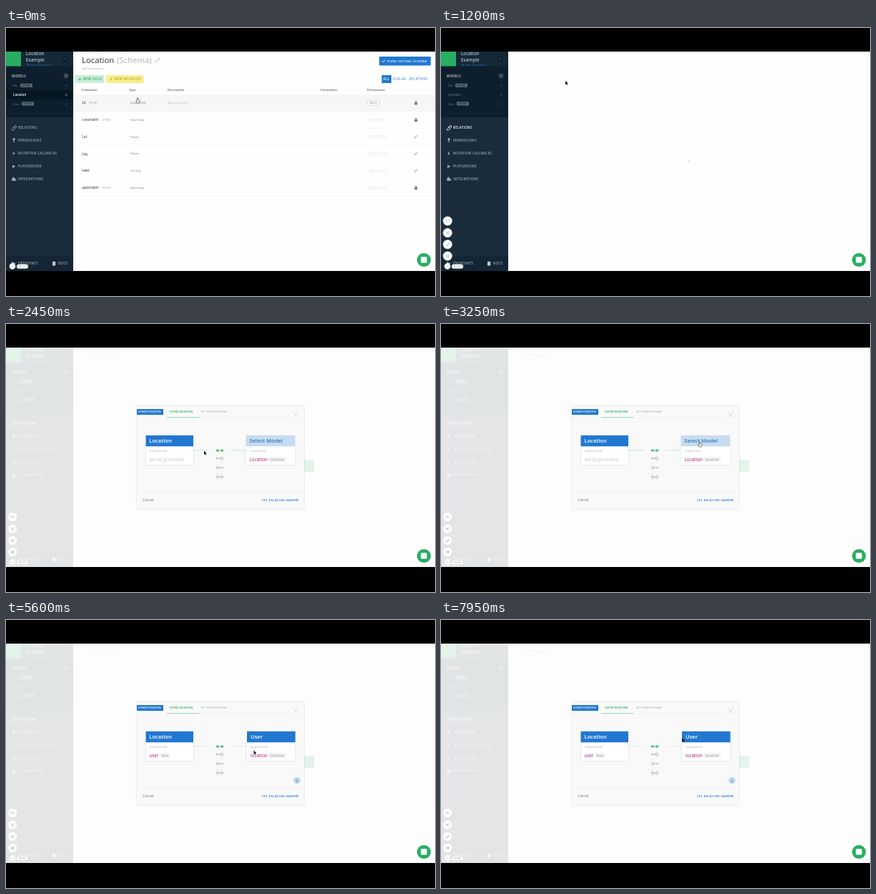
Write an HTML page that moves like this. It is 600 px wide and 375 px high and loops after 8 s.

```html
<!DOCTYPE html>
<html lang="en">
<head>
<meta charset="utf-8">
<title>Schema editor</title>
<style>
html, body { margin: 0; width: 100%; height: 100%; overflow: hidden; background: #000; }
svg { display: block; width: 600px; height: 375px; font-family: "Open Sans", sans-serif; }
text { white-space: pre; }
.mono { font-family: "Noto Sans Mono", monospace; }
.b { font-weight: 600; }
.i { font-style: italic; }
.caps { letter-spacing: .35px; }
.card { filter: drop-shadow(0 .6px 1px rgba(0,0,0,.16)); }
</style>
</head>
<body>
<svg id="stage" viewBox="0 0 600 375"></svg>
<script>
const LOOP = 8000, STEP = 50;
const BLUE = '#2278d0', GREEN = '#27ae60', PINK = '#a3156f';

const rect = (x, y, w, h, fill, more = '') =>
  `<rect x="${x}" y="${y}" width="${w}" height="${h}" fill="${fill}" ${more}/>`;
const disc = (x, y, r, fill, more = '') => `<circle cx="${x}" cy="${y}" r="${r}" fill="${fill}" ${more}/>`;
const line = (d, color, w = .6, more = '') =>
  `<path d="${d}" fill="none" stroke="${color}" stroke-width="${w}" ${more}/>`;
const shape = (d, fill) => `<path d="${d}" fill="${fill}"/>`;
const text = (x, y, size, fill, str, cls = '') =>
  `<text x="${x}" y="${y}" font-size="${size}" fill="${fill}" class="${cls}">${str}</text>`;
const group = (id, body, more = '') => `<g id="${id}" ${more}>${body}</g>`;
const at = (x, y, body) => `<g transform="translate(${x} ${y})">${body}</g>`;

const pencil = (x, y, s, color) =>
  `<g transform="translate(${x} ${y}) scale(${s})">${line('M-2 2L-1.5.6L1.2-2.1L2.1-1.2L-.6 1.5Z', color, .6)}</g>`;
const lock = (x, y) => rect(x - 1.9, y - .8, 3.8, 3.6, '#777', 'rx=".6"') +
  line(`M${x - 1.1} ${y - .6}v-1a1.1 1.1 0 0 1 2.2 0v1`, '#777', .7);

// Sidebar
function systemModel(name, y, badgeX) {
  return text(10, y, 4.2, '#71808c', name) +
    rect(badgeX, y - 4.3, 17, 5.2, '#586773', 'rx=".8"') +
    text(badgeX + 2, y - .4, 3.1, '#162a38', 'SYSTEM', 'b') +
    text(83.3, y, 3.8, '#71808c', '0');
}

const linkIcons = [
  c => line('M9 140.5l1-1a1.3 1.3 0 0 1 2 2l-1.5 1.2a1.3 1.3 0 0 1-2-1.7M11 139.3l-.4-.7 1.5-1.6a1.3 1.3 0 0 1 2 2l-1.3 1.2', c, .9),
  c => disc(11, 155.6, 1.7, c) + rect(10.4, 156, 1.2, 4, c),
  c => shape('M11.8 172.5l-3 3.3h1.8l-.8 2.8 3-3.6H11z', c),
  c => shape('M9 191.5l4.4 2.2L9 195.9z', c),
  c => rect(8.3, 210.2, 4.5, 3.6, c) + disc(10.4, 209.7, 1.2, c) + disc(13, 212.4, 1.2, c)
];
const linkNames = ['RELATIONS', 'PERMISSIONS', 'MUTATION CALLBACKS', 'PLAYGROUND', 'INTEGRATIONS'];
const links = linkNames.map((name, k) => {
  const y = 141 + k * 18.1, c = '#9eabb5';
  const one = col => linkIcons[k](col) + text(17, y, 4.4, col, name, 'caps b');
  return k ? one(c) : group('linkOff', one(c)) + group('linkOn', one('#fff'));
}).join('');

const sidebar = rect(0, 33, 94, 307, '#1a2b3b') +
  rect(0, 33, 94, 21, '#142838') + rect(0, 53.5, 94, 71.5, '#0d1f2c') +
  rect(0, 33, 21, 20.5, GREEN) +
  text(28, 38, 6.4, '#e8edf0', 'Location') + text(28, 46.8, 6.4, '#e8edf0', 'Example') +
  disc(30.5, 50.7, .8, '#2a6fb0') + rect(29.3, 51.5, 2.4, 1.1, '#2a6fb0') +
  text(33.5, 52.8, 3.7, '#2a6fb0', 'Add collaborators') +
  disc(83, 43, 4, '#0d1f2c') + line('M81.8 42.5l1.2 1.1 1.2-1.1', '#a9b4bc') +
  text(8, 68.6, 4.4, '#d5dce1', 'MODELS', 'caps b') +
  disc(84, 66.8, 2.8, 'none', 'stroke="#8d9aa4" stroke-width=".6"') + line('M82.7 66.8h2.6M84 65.5v2.6', '#bcc6cd') +
  systemModel('File', 82, 20) + systemModel('User', 107.6, 22) +
  group('modelOff', text(10, 94.8, 4.4, '#71808c', 'Location') + text(83.3, 94.8, 3.8, '#71808c', '0')) +
  group('modelOn', rect(0, 87, 94, 12.5, '#061722') + text(10, 94.8, 4.4, '#fff', 'Location', 'b') +
    text(83.3, 94.8, 3.8, '#fff', '0')) +
  links + rect(0, 319, 94, 21, '#142636') +
  shape('M8 327l6 2.4-6 2.4z', '#9eabb5') +
  text(17, 331.2, 4.4, '#9eabb5', 'ENDPOINTS', 'caps b') +
  rect(65, 326.8, 4.2, 5.6, '#c0cad1', 'rx=".5"') + text(73, 331.2, 4.4, '#9eabb5', 'DOCS', 'caps b');

// Schema page
const fields = [
  ['id', 'GraphQLID', 1], ['createdAt', 'DateTime', 1], ['lat', 'Float', 0],
  ['lng', 'Float', 0], ['name', 'String', 0], ['updatedAt', 'DateTime', 1]
];
const rows = fields.map(([name, type, system], k) => {
  const y = 104.7 + k * 23.75;
  return (k ? '' : rect(94, 93, 506, 23.8, '#f6f6f6')) +
    rect(94, y + 11.9, 506, .4, '#efefef') +
    text(106, y + 1.6, 4.4, '#333', name, 'mono') +
    (system ? text(110.5 + name.length * 2.65, y + 1.2, 3.1, '#9a9a9a', 'SYSTEM') : '') +
    text(174, y + 1.5, 4, '#777', type, 'mono') +
    (k ? text(508, y + 1.2, 3.4, '#dcdcdc', 'UNRESTRICTED') + rect(506, y + 2.6, 32, .3, '#e8e8e8')
       : text(226, y + 1.5, 4.2, '#bbb', 'Add description', 'i') +
         rect(505.3, y - 3, 17, 6.2, '#fff', 'rx=".8" stroke="#aaa" stroke-width=".4"') +
         text(507.7, y + 1.3, 3.5, '#777', 'SINGLE')) +
    (system ? lock(573.3, y) : pencil(573.3, y, 1, '#888'));
}).join('');
const heads = [[106, 'Fieldname'], [172, 'Type'], [226, 'Description'], [440, 'Constraints'], [505, 'Permissions']]
  .map(([x, s]) => text(x, 88, 4.25, '#555', s, 'b')).join('');

const schema = text(106, 49, 11.4, '#333', 'Location') + text(155, 49, 11.4, '#b5b5b5', '(Schema)') +
  pencil(212, 45, 1.5, '#bbb') + text(106, 58.2, 4.2, '#aaa', 'Add description') +
  rect(522, 40, 72, 12.4, BLUE, 'rx=".8"') + line('M526 46.2l1.4 1.5 2.6-3', '#fff', .9) +
  text(533, 47.9, 4.3, '#fff', 'DONE EDITING SCHEMA', 'caps b') +
  rect(97, 66, 40.5, 11, '#cbeeda', 'rx=".8"') + line('M101 71.5h4M103 69.5v4', GREEN, .7) +
  text(108, 73.1, 4.5, GREEN, 'NEW FIELD', 'caps b') +
  rect(140, 66, 52.5, 11, '#f8ee8e', 'rx=".8"') + line('M145 71.5h4M147 69.5v4', '#b7a52c', .7) +
  text(152, 73.1, 4.4, '#b7a52c', 'NEW RELATION', 'caps b') +
  rect(525.5, 66, 13.5, 11, BLUE) + text(527.5, 73.2, 4.6, '#fff', 'ALL', 'caps b') +
  text(541, 73.2, 4.5, BLUE, 'SCALAR', 'caps') + text(564, 73.2, 4.5, BLUE, 'RELATIONS', 'caps') +
  heads + rows;

// Relations page
const relations = line('M116 43h3.4M117.7 41.3v3.4', '#777', .6) +
  text(122, 44.6, 4.1, '#777', 'NEW RELATION', 'caps') +
  rect(263, 190, 168, 17, GREEN, 'rx="1"') + text(318, 200.5, 5.4, '#fff', 'CREATE RELATION', 'caps b');

// Dialog
const badge = (x, w, s) => rect(x, 186.6, w, 6.4, '#eee', 'rx="1"') + text(x + 1.7, 191.3, 3.9, '#888', s, 'mono');
const cardBody = (x, w) => rect(x, 171, w, 26, '#fff', 'class="card"') +
  text(x + 5, 178.5, 4.15, '#aaa', 'related field:');
const fan = (y, d) => at(299, y, line(d, '#bdbdbd', .8) +
  [-4, 4].map(x => rect(x - 1, -1, 2, 2, '#b5b5b5')).join(''));

const dialog = rect(183, 115, 234, 144, '#f9f9f9', 'class="card"') +
  rect(183, 234, 234, .5, '#ececec') + rect(183, 130.8, 213, .4, '#e8e8e8') +
  rect(183, 119, 37, 8, BLUE) + text(184.8, 124.3, 3.6, '#fff', 'UPDATE RELATION', 'b') +
  text(229, 124.3, 3.6, GREEN, 'DEFINE RELATIONS', 'b') + rect(224, 130.4, 46, .8, '#8ed3a9') +
  text(273, 124.3, 3.75, '#aaa', 'SET RELATION NAME') +
  line('M401.3 123.5l7.4 7.4M408.7 123.5l-7.4 7.4', '#c4c4c4', .6) +
  group('wires', line('M262 176.8h22M314 176.8h22', '#9fdab6', .6)) +
  group('greyWires', line('M262 176.8h22M316 176.8h21', '#d8d8d8', .6)) +
  line('M295 177h8', GREEN, 1) + shape('M296.5 174.8l-3 2.2 3 2.2zM301.5 174.8l3 2.2-3 2.2z', GREEN) +
  fan(188, 'M-4 0H-1L4-3.5M-1 0H4M-1 0L4 3.5') + fan(201, 'M4 0H1L-4-3.5M1 0H-4M1 0L-4 3.5') +
  fan(214, 'M-4-3.5L4 3.5M-4 3.5L4-3.5M-4 0H4') +
  cardBody(196, 66) + rect(195.5, 155.8, 66.5, 15.4, BLUE) + text(200.3, 166, 7.6, '#fff', 'Location', 'b') +
  group('pending', text(200.5, 192, 6.4, '#c8c8c8', 'will be generated', 'i')) +
  group('linked', text(200.3, 192, 6.4, PINK, 'user') + badge(216, 13, 'User')) +
  group('emptyBody', cardBody(335.5, 69) + text(340.5, 192, 6.4, PINK, 'Location') + badge(368, 23, 'Location')) +
  group('picker', rect(335.5, 155.8, 69, 15.4, '#c6dcef') + text(340.3, 166, 7.6, '#2e76c2', 'Select Model', 'b')) +
  group('caret', shape('M392.7 165.3h4l-2 2z', '#2e76c2')) +
  group('menu', rect(326, 171, 71, 57.5, '#fff', 'class="card"') +
    ['User', 'File', 'Location'].map((s, k) => text(333.3, 182.2 + k * 19.4, 6.4, '#aaa', s)).join('')) +
  group('chosen', cardBody(337, 67.5) + rect(337, 155.8, 67.7, 15.4, BLUE) +
    text(342, 166, 7.6, '#fff', 'User', 'b') + text(342, 192, 6.4, PINK, 'location') + badge(368, 23, 'Location') +
    disc(407, 224.6, 4.6, '#b4d5ee') + text(406.3, 226.5, 5, BLUE, 'i', 'b')) +
  text(191, 248, 5, '#777', 'Cancel') + text(358, 247.8, 4.15, BLUE, 'SET RELATION NAME', 'b caps') +
  line('M404 246.3h4.6M406.6 244.3l2 2-2 2', BLUE, .8);

// Recorder buttons, chat launcher, pointer
const button = (y, icon) => at(9.2, y, disc(0, 0, 6.3, '#fff', 'stroke="#ddd" stroke-width=".4"') + icon);
const recorder = group('buttons',
    button(270, text(-3.2, 1.4, 4, '#999', 'Set')) +
    button(286.6, line('M-2-2L2 2M2-2L-2 2', '#b98d8d', .7)) +
    button(302.8, line('M-2.4 0L-.7 1.8L2.5-1.8', '#888', .8)) +
    button(319, line('M-1.1-2v4M1.1-2v4', '#999', .9))) +
  disc(9, 333.4, 4.2, '#fff', 'stroke="#ddd" stroke-width=".4"') + line('M7.2 333.4h3.6', '#bbb', .6) +
  rect(15, 330.8, 16, 5.8, '#fff', 'rx="2.9" stroke="#ccc" stroke-width=".4"') +
  `<text id="clock" x="17.8" y="335.1" font-size="3.8" fill="#999"></text>`;
const chat = disc(584.5, 324.5, 9.6, GREEN, 'class="card"') + rect(580.2, 320.2, 8.4, 8.4, '#fff', 'rx="1"');
const pointer = group('pointer',
  group('arrow', shape('M0 0V5.3L1.3 4.2L2.1 6L3 5.6L2.2 3.9L3.8 3.8Z', '#111') ) +
  group('hand', `<path d="M-.7 3.3V-.8a.7.7 0 0 1 1.4 0V1.4L3 2V4.2L2.2 6H-.6L-2.4 3.2Z" fill="#fff" stroke="#333" stroke-width=".6"/>`));

document.getElementById('stage').innerHTML =
  rect(0, 0, 600, 375, '#000') + rect(94, 33, 506, 307, '#fefefe') +
  group('schema', schema) + group('relations', relations) + sidebar +
  group('spinner', line('M346.2 186.8a.8.8 0 1 0 .8-.8', '#999', .6)) +
  group('veil', rect(0, 33, 600, 307, '#fdfdfd', 'opacity=".885"') + dialog) +
  chat + recorder + pointer;

const el = id => document.getElementById(id);
const show = (id, on) => { el(id).style.display = on ? '' : 'none'; };
const ease = k => k * k * (3 - 2 * k);

// time, x, y
const path = [
  [50, 184, 99], [650, 30, 139], [880, 30, 139], [1200, 174, 74], [1400, 174, 74],
  [1600, 145, 43], [1680, 145, 43], [1850, 197.5, 129], [2450, 277, 177.5], [3050, 350, 172],
  [3350, 366, 164], [3650, 366, 164], [4250, 348, 182], [5600, 346.5, 182.5],
  [6300, 322, 186], [6450, 322, 186], [6500, 320, 187], [6850, 320, 187],
  [7300, 350, 195], [7650, 340, 178], [7700, 340, 178], [7950, 337, 165]
];
function pointerAt(t) {
  if (t <= path[0][0]) return path[0].slice(1);
  const k = path.findIndex(p => p[0] > t);
  if (k < 0) return path[path.length - 1].slice(1);
  const a = path[k - 1], b = path[k], u = ease((t - a[0]) / (b[0] - a[0]));
  return [a[1] + (b[1] - a[1]) * u, a[2] + (b[2] - a[2]) * u];
}

function draw(now) {
  const t = Math.floor(now % LOOP / STEP) * STEP;
  const opened = t >= 3650 && t < 4600, picked = t >= 4600;
  const left = t >= 850;

  show('schema', !left);
  show('modelOn', !left);
  show('modelOff', left);
  show('linkOn', left);
  show('linkOff', !left);
  show('spinner', t >= 900 && t < 1250);
  show('relations', t >= 1250);
  el('spinner').setAttribute('transform', `rotate(${t * .72} 347 186.8)`);

  show('veil', t >= 1650);
  el('veil').style.opacity = Math.min(1, (t - 1600) / 200);
  show('wires', t < 3650);
  show('greyWires', t >= 3650);
  show('pending', !picked);
  show('linked', picked);
  show('emptyBody', !opened && !picked);
  show('picker', !picked);
  show('caret', t >= 3350 && !picked);
  show('menu', opened);
  show('chosen', picked);

  show('buttons', t >= 400);
  el('clock').textContent = '00:' + (21 + Math.floor(t / 1000));

  const [x, y] = pointerAt(t);
  const hand = t < 350 || (t >= 600 && t < 950) || (t >= 1550 && t < 1750) || (t >= 3150 && t < 4600);
  show('hand', hand);
  show('arrow', !hand);
  el('pointer').setAttribute('transform', `translate(${x} ${y})`);
}

const start = performance.now();
function tick() {
  draw(performance.now() - start);
  requestAnimationFrame(tick);
}
tick();
</script>
</body>
</html>
```
